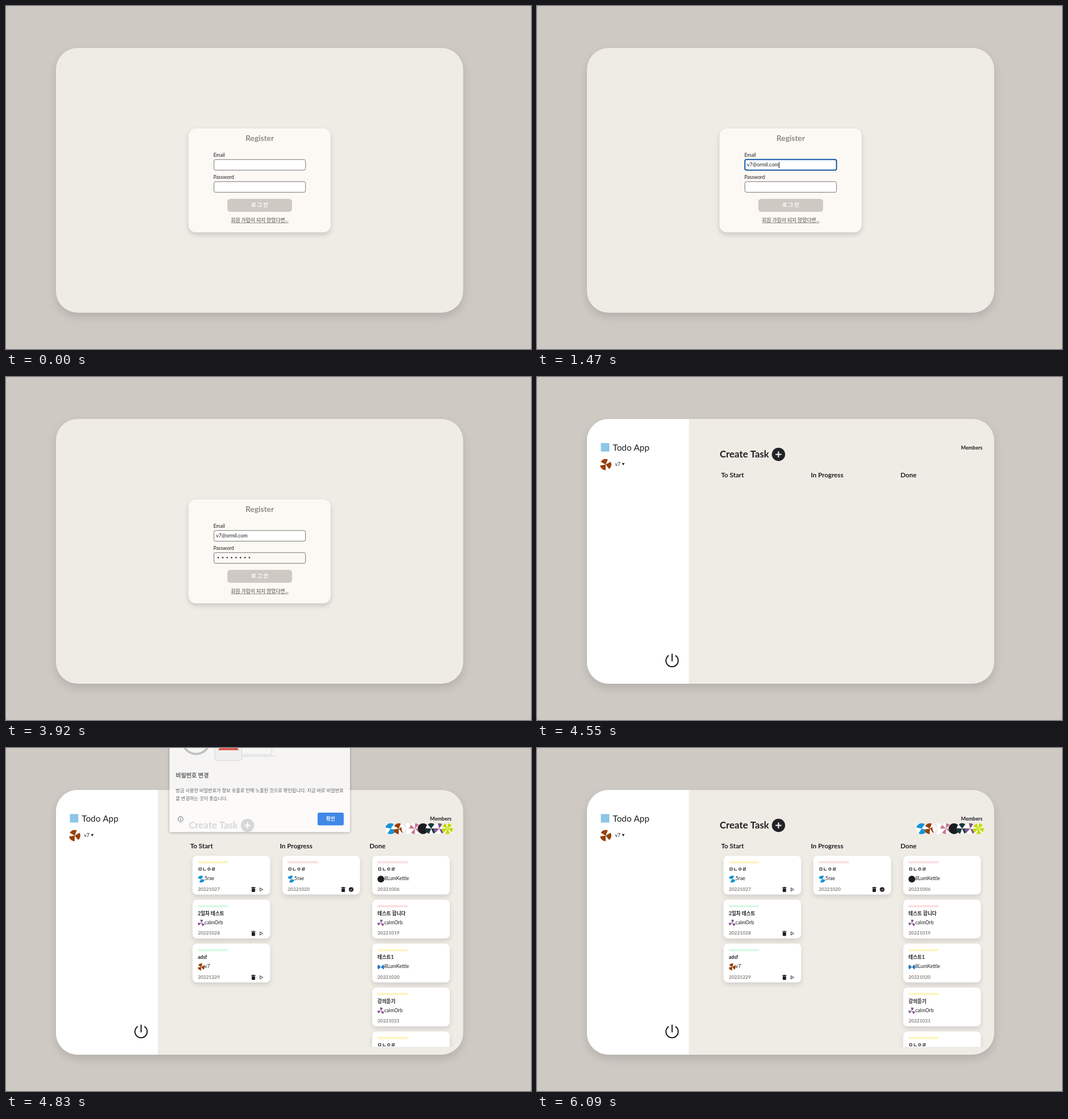
Recreate the animation shown at these times as an HTML page with a canvas. Size 925 by 605 pixels, loop 7.07 s.

```html
<!DOCTYPE html>
<html lang="ko">
<head>
<meta charset="utf-8">
<title>Todo App</title>
<style>
html, body { margin: 0; width: 100%; height: 100%; overflow: hidden; background: #cec9c3; }
canvas { position: absolute; left: 0; top: 0; }
</style>
</head>
<body>
<canvas id="stage" width="925" height="605"></canvas>
<canvas id="modal" width="925" height="605"></canvas>
<script>
const LOOP = 7070, STEP = 70, TAU = Math.PI * 2;
const FONT = 'Lato, "Noto Sans CJK KR", "Noto Sans CJK", sans-serif';
const INK = '#1f1f21', SAND = '#cec9c3', PANEL = '#efece6', CREAM = '#fcf8f4';
const GREY = '#85817d', LINE = '#d5d7da';
const YELLOW = '#fdf6c3', PINK = '#fbe0e1', GREEN = '#d9fae4';
const USER = 'v7', EMAIL = 'v7@ormil.com';
const stage = document.getElementById('stage').getContext('2d');
const modalLayer = document.getElementById('modal');
const modal = modalLayer.getContext('2d');
let g = stage;

function stroke(color, width) {
  g.strokeStyle = color;
  g.lineWidth = width;
  g.stroke();
}

function box(x, y, w, h, r, fill, edge, width = 1) {
  g.beginPath();
  g.roundRect(x, y, w, h, r);
  if (fill) { g.fillStyle = fill; g.fill(); }
  if (edge) stroke(edge, width);
}

function shadowBox(x, y, w, h, r, fill, dy, blur, alpha) {
  g.save();
  g.shadowColor = `rgba(0,0,0,${alpha})`;
  g.shadowOffsetY = dy;
  g.shadowBlur = blur;
  box(x, y, w, h, r, fill);
  g.restore();
}

function text(str, x, y, size, color = INK, weight = 400, align = 'left') {
  g.font = `${weight} ${size}px ${FONT}`;
  g.fillStyle = color;
  g.textAlign = align;
  g.fillText(str, x, y);
  return g.measureText(str).width;
}

function disc(x, y, r, fill) {
  box(x - r, y - r, r * 2, r * 2, r, fill);
}

function arc(x, y, r, from, to, color, width) {
  g.beginPath();
  g.arc(x, y, r, from, to);
  stroke(color, width);
}

function line(x1, y1, x2, y2, color, width) {
  g.beginPath();
  g.moveTo(x1, y1);
  g.lineTo(x2, y2);
  stroke(color, width);
}

// Regular triangle whose tip points along the angle
function triangle(x, y, r, angle) {
  g.beginPath();
  for (let i = 0; i < 3; i++) {
    const a = angle + i * TAU / 3;
    g.lineTo(x + r * Math.cos(a), y + r * Math.sin(a));
  }
  g.closePath();
}

// Each face: colour, number of blades, share of the circle they fill, turn
const FACES = {
  sky: ['#1793d3', 2, .62, 1.2],
  brown: ['#964009', 3, .68, -1.9],
  white: ['#eee5e7', 3, .25, 0],
  pink: ['#cb7897', 4, .5, .4],
  black: ['#1d1d1f', 1, 1, 0],
  teal: ['#18373f', 3, .62, 2.6],
  purple: ['#85548f', 3, .42, -1.4],
  lime: ['#c5db12', 5, .74, 1.5],
  blue: ['#2876c4', 2, .5, 0]
};

function avatar(name, x, y, r) {
  const [color, count, share, turn] = FACES[name];
  const half = Math.PI * share / count;
  disc(x, y, r, '#fff');
  g.fillStyle = color;
  for (let i = 0; i < count; i++) {
    const a = turn + i * TAU / count;
    g.beginPath();
    g.moveTo(x, y);
    g.arc(x, y, r, a - half, a + half);
    g.fill();
  }
}

function background() {
  box(0, 0, 925, 605, 0, '#66625e');
  box(0, 0, 925, 605, 2, SAND);
  shadowBox(88, 74, 717.5, 467, 38, PANEL, 7, 15, .13);
}

function field(y, focused, fill = '#fff') {
  box(366.3, y + .3, 161.4, 18.8, 3, fill, focused ? '#1159a5' : '#77757a', focused ? 2 : 1);
}

function caret(x, y) {
  g.fillStyle = '#111';
  g.fillRect(Math.round(x), y, 1, 11);
}

function suggestions(hover) {
  shadowBox(433, 295, 117, 159, 4, '#fff', 1, 3, .25);
  if (hover) box(433, 299, 117, 25, 0, '#e9e9ea');
  for (let i = 0; i < 6; i++) {
    const y = 310 + i * 25;
    text(i ? USER + '0' + i : EMAIL, 443, y, 8.5);
    text('••••••••', 443, y + 9, 7, GREY);
  }
}

// Four keys typed from a start time at a steady pace
function burst(t, start, pace) {
  return t < start ? 0 : Math.min(4, 1 + Math.floor((t - start) / pace));
}

function login(t) {
  const onEmail = t >= 1050 && t < 2100;
  const onPassword = t >= 2100 && t < 3710;
  const dots = burst(t, 2520, 93) + burst(t, 3080, STEP);
  const pitch = 7.86;

  shadowBox(321.5, 216, 250.5, 183.3, 13, CREAM, 4, 9, .16);
  text('Register', 447, 238, 13.8, '#8e8b88', 700, 'center');

  text('Email', 365.5, 265.8, 8.6);
  field(270.5, onEmail);
  const width = t >= 1400 ? text(EMAIL, 370, 283, 8.9) : 0;
  if (onEmail && t < 1960) caret(370 + width, 275);

  text('Password', 365.5, 304.8, 8.6);
  field(309.5, onPassword, t >= 3710 ? CREAM : '#fff');
  for (let i = 0; i < dots; i++) disc(373.9 + i * pitch, 318.6, 1.25, INK);
  if (onPassword) caret(370 + dots * pitch, 313);

  box(390, 340.3, 114, 22.7, 5, SAND);
  text('로 그 인', 447, 354, 9.1, '#fff', 700, 'center');
  text('회원 가입이 되지 않았다면...', 447, 381.2, 8.8, GREY, 700, 'center');
  line(396.5, 382.7, 497.5, 382.7, GREY, .9);
  if (t >= 1190 && t < 1470) suggestions(t >= 1400);
}

function sidebar() {
  box(88, 74, 179.5, 467, [38, 0, 0, 38], '#fff');
  box(112.5, 116.5, 15, 15, 0, '#8dc6e6');
  text('Todo App', 133.5, 130, 15.3);
  avatar('brown', 121, 154.5, 10);
  text(USER, 137.5, 157, 8.5);
  triangle(152, 153.2, 2.7, TAU / 4);
  g.fillStyle = INK;
  g.fill();
  arc(238, 500.3, 10.8, -1, Math.PI + 1, INK, 2);
  line(238, 488, 238, 501.5, INK, 2);
}

function headings() {
  const x = 425.5, y = 136.5, arm = 5.2;
  text('Create Task', 322, 141.5, 16.8, INK, 700);
  disc(x, y, 11.7, '#222327');
  line(x - arm, y, x + arm, y, '#fff', 2);
  line(x, y - arm, x, y + arm, '#fff', 2);
  text('Members', 785, 128.4, 9, INK, 700, 'right');
  ['To Start', 'In Progress', 'Done'].forEach((name, i) =>
    text(name, 324.5 + i * 158, 177, 11.6, INK, 700));
}

function trash(x, y) {
  box(x - 3.8, y - 3.7, 7.6, 1.3, 0, INK);
  box(x - 1.5, y - 4.4, 3, 1, 0, INK);
  box(x - 3, y - 1.8, 6, 6.3, 1, INK);
}

function play(x, y) {
  triangle(x - .6, y, 3.3, 0);
  stroke(INK, .9);
}

function check(x, y) {
  disc(x, y, 4.1, INK);
  line(x - 1.8, y, x - .5, y + 1.4, '#fff', 1);
  line(x - .5, y + 1.4, x + 1.9, y - 1.3, '#fff', 1);
}

function card(x, y, action, [bar, title, face, name, date]) {
  shadowBox(x, y, 136.8, 68.5, 8, '#fff', 4, 9, .13);
  box(x + 9.3, y + 9.4, 53.3, 4.2, 0, bar);
  text(title, x + 9.3, y + 27.4, 8.6, INK, 700);
  avatar(face, x + 15.3, y + 41.2, 6);
  text(name, x + 21.2, y + 43.3, 8.7);
  text(date, x + 9.3, y + 61.5, 8.4, GREY, 700);
  if (!action) return;
  trash(x + 107.3, y + 59.4);
  action(x + 121.2, y + 59.6);
}

const LAZY = 'ㅁㄴㅇㄹ', RAE = '5rae', ORB = 'calmOrb', POT = '8LumKettle';
const COLUMNS = [
  [play, [
    [YELLOW, LAZY, 'sky', RAE, '20221027'],
    [GREEN, '2일차 테스트', 'purple', ORB, '20221028'],
    [GREEN, 'adsf', 'brown', USER, '20221229']
  ]],
  [check, [
    [PINK, LAZY, 'sky', RAE, '20221020']
  ]],
  [null, [
    [PINK, LAZY, 'black', POT, '20221006'],
    [PINK, '테스트 합니다', 'purple', ORB, '20221019'],
    [YELLOW, '테스트1', 'blue', POT, '20221020'],
    [YELLOW, '강의듣기', 'purple', ORB, '20221021'],
    [YELLOW, LAZY, 'sky', RAE, '20221022']
  ]]
];

function tasks() {
  Object.keys(FACES).slice(0, 8).forEach((name, i) =>
    avatar(name, 677.8 + i * 14.26, 142.3, 9.6));
  g.save();
  g.beginPath();
  g.rect(300, 180, 500, 347);
  g.clip();
  COLUMNS.forEach(([action, cards], col) => cards.forEach((data, row) =>
    card(328.6 + col * 158.3, 190 + row * 77.5, action, data)));
  g.restore();
}

function drawModal(pressed) {
  const ink = '#45484c';
  g = modal;
  g.clearRect(0, 0, 925, 605);
  shadowBox(288, -30, 318, 178.3, 3, '#fff', 1, 5, .35);

  arc(335, -13, 23.5, .3, Math.PI - .3, '#bdc1c6', 4);
  box(400, -20, 68.5, 32, 2, null, LINE);
  line(416, 14.5, 477, 14.5, LINE, 1);
  box(368, -20, 47.5, 42, 4, '#f8f9fa', LINE);
  triangle(392, -6.5, 21, -TAU / 4);
  g.fillStyle = '#e2453c';
  g.fill();

  text('비밀번호 변경', 299, 52.3, 10.1, ink, 700);
  text('방금 사용한 비밀번호가 정보 유출로 인해 노출된 것으로 확인됩니다. 지금 바로 비밀번호', 299, 78, 8.2, ink, 500);
  text('를 변경하는 것이 좋습니다.', 299, 92.3, 8.2, ink, 500);
  arc(307.5, 125.4, 4.5, 0, TAU, ink, 1);
  line(307.5, 124.6, 307.5, 128, ink, 1);
  line(307.5, 122.6, 307.5, 123.6, ink, 1);
  box(549, 114, 46, 22.6, 2.5, pressed ? '#1765cc' : '#1a73e8');
  text('확인', 572, 128.4, 8.6, '#fff', 700, 'center');
  g = stage;
}

function modalAlpha(t) {
  if (t < 4830 || t >= 6090) return 0;
  if (t < 4900) return .82;
  return Math.min(1, (6090 - t) / 420);
}

function frame(now) {
  const t = Math.floor(now % LOOP / STEP) * STEP;
  background();
  if (t < 4550) {
    login(t);
  } else {
    sidebar();
    headings();
    if (t >= 4620) tasks();
  }
  const alpha = modalAlpha(t);
  modalLayer.style.opacity = alpha;
  if (alpha) drawModal(t >= 5670);
  requestAnimationFrame(frame);
}

frame(performance.now());
</script>
</body>
</html>
```
